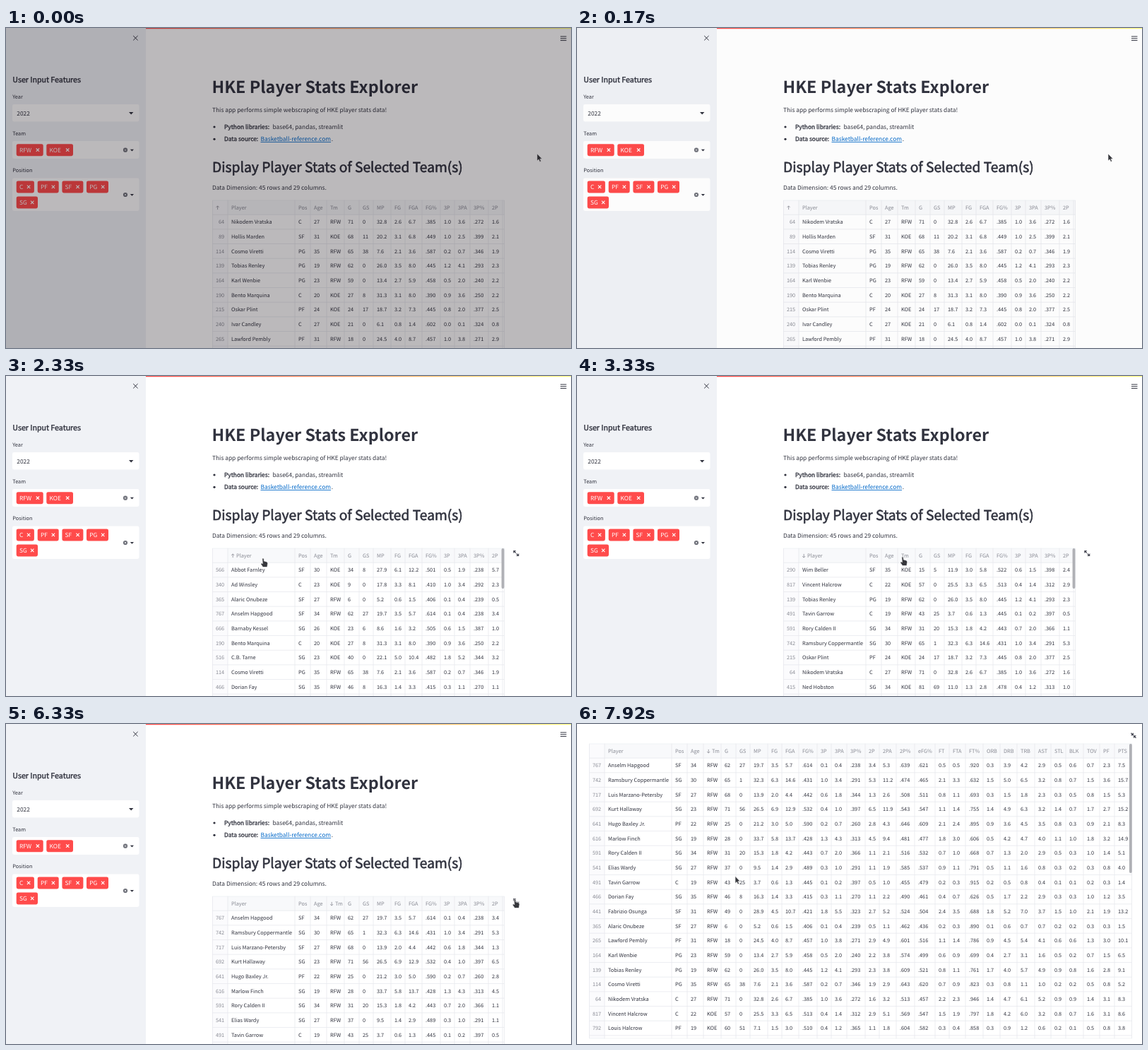
Animation of 800x453 px, one loop 8 s. Source, as an HTML page:

```html
<!DOCTYPE html>
<html lang="en">
<head>
<meta charset="utf-8">
<title>Player Stats Explorer</title>
<style>
  html, body { margin: 0; width: 100%; height: 100%; overflow: hidden; background: #fff; }
  svg { display: block; }
  text {
    font-family: "Noto Sans CJK JP", "Noto Sans CJK SC", "Noto Sans CJK KR", "Noto Sans CJK TC", "Noto Sans", sans-serif;
    font-size: 8.4px; fill: #31333f; text-rendering: geometricPrecision; white-space: pre;
  }
  .title { font-size: 23.3px; font-weight: 700; }
  .semi { stroke: #31333f; stroke-width: .3px; }
  .heading { font-size: 19.25px; stroke-width: .6px; }
  .side { font-size: 10.65px; stroke-width: .4px; }
  .label, .cell, .head, .index { font-size: 7.35px; }
  .head, .index { fill: #898b94; }
  .index { text-anchor: end; }
  .link { fill: #0068c9; text-decoration: underline; }
  .tag { fill: #fff; }
  .line { fill: none; stroke: #31333f; stroke-width: 1; }
  .grid { fill: none; stroke: #e8e9ee; stroke-width: .8; }
  .sort { fill: none; stroke: #898b94; stroke-width: .8; }
  .bar { fill: #b0b1b6; }
</style>
</head>
<body>
<svg id="stage" width="800" height="453" viewBox="0 0 800 453">
  <defs>
    <linearGradient id="glow"><stop stop-color="#ff4b4b"/><stop offset="1" stop-color="#fffd80"/></linearGradient>
  </defs>
</svg>
<script>
const stage = document.getElementById('stage');

function el(tag, attrs, parent = stage, content) {
  const node = document.createElementNS('http://www.w3.org/2000/svg', tag);
  for (const key in attrs) node.setAttribute(key, attrs[key]);
  if (content !== undefined) node.textContent = content;
  parent.appendChild(node);
  return node;
}
const text = (x, y, content, cls = '', parent = stage) => el('text', { x, y, class: cls }, parent, content);
const rect = (x, y, width, height, fill, rx = 0, parent = stage) => el('rect', { x, y, width, height, fill, rx }, parent);
const path = (d, attrs, parent = stage) => el('path', { d, ...attrs }, parent);
const show = (node, on) => node.setAttribute('display', on ? 'inline' : 'none');

function randomFrom(seed) {
  return (low, high) => {
    seed = (seed * 16807) % 2147483647;
    return low + (high - low) * seed / 2147483647;
  };
}

// Players in index order; their numbers follow from a seeded season
const roster = `Nikodem Vratska,C,RFW
Hollis Marden,SF,KOE
Cosmo Viretti,PG,RFW
Tobias Renley,PG,RFW
Karl Wenbie,PG,RFW
Bento Marquina,C,KOE
Oskar Plint,PF,KOE
Ivar Candley,C,KOE
Lawford Pembly,PF,RFW
Wim Beller,SF,KOE
Joselo Valdemínguez,PF,KOE
Ad Winsley,C,KOE
Alaric Onubeze,SF,RFW
Garrett Lisson,SF,KOE
Ned Hobston,SG,KOE
Fabrizio Osunga,SF,RFW
Dorian Fay,SG,RFW
Tavin Garrow,C,RFW
C.B. Tarne,SG,KOE
Elias Wardy,SG,RFW
Abbot Farnley,SF,KOE
Rory Calden II,SG,RFW
Marlow Finch,SG,RFW
Hugo Baxley Jr.,PF,RFW
Barnaby Kessel,SG,KOE
Kurt Hallaway,SG,RFW
Luis Marzano-Petersby,SF,RFW
Ramsbury Coppermantle,SG,RFW
Anselm Hapgood,SF,RFW
Louis Halcrow,PF,KOE
Vincent Halcrow,C,KOE`;

const one = v => v.toFixed(1);
const ratio = (made, tried) => tried < .05 ? '0' : (made / tried).toFixed(3).replace(/^0/, '');

function season(seed) {
  const rnd = randomFrom(seed * 7919);
  rnd(0, 1);
  const age = Math.floor(rnd(19, 38));
  const games = Math.floor(rnd(1, 82));
  const starts = Math.floor(games * Math.max(0, rnd(-.6, 1)));
  const minutes = rnd(3, 34);
  const shots = minutes * rnd(.2, .5);
  const threes = shots * rnd(.05, .55);
  const twos = shots - threes;
  const frees = minutes * rnd(.02, .12);
  const made3 = threes * rnd(.22, .4);
  const made2 = twos * rnd(.45, .65);
  const madeFree = frees * rnd(.6, .95);
  const made = made2 + made3;
  const off = minutes * rnd(.01, .07);
  const def = minutes * rnd(.08, .2);
  const rest = [.15, .04, .03, .06, .1].map(rate => one(minutes * rate * rnd(.5, 1.3)));
  return [age, games, starts, one(minutes),
    one(made), one(shots), ratio(made, shots),
    one(made3), one(threes), ratio(made3, threes),
    one(made2), one(twos), ratio(made2, twos),
    ratio(made + made3 / 2, shots),
    one(madeFree), one(frees), ratio(madeFree, frees),
    one(off), one(def), one(off + def), ...rest,
    one(made2 * 2 + made3 * 3 + madeFree)];
}

const players = roster.split('\n').map((line, i) => {
  const [name, pos, team] = line.split(',');
  const id = 64 + Math.round(i * 25.1);
  const [age, ...stats] = season(id);
  return { id, name, team, cells: [name, pos, age, team, ...stats] };
});

// Column heads with their widths
let nextX = 27;
const columns = ('Player 95,Pos 22,Age 23,Tm 25,G 21,GS 20,MP 25,FG 20,FGA 24,FG% 26,3P 20,3PA 22,3P% 26,2P 20,2PA 24,'
  + '2P% 26,eFG% 29,FT 20,FTA 23,FT% 25,ORB 24,DRB 24,TRB 25,AST 23,STL 21,BLK 25,TOV 23,PF 21,PTS 20')
  .split(',').map(entry => {
    const [name, width] = entry.split(' ');
    const x = nextX;
    nextX += +width;
    return { name, x };
  });
const PITCH = 20.67;

// Page
rect(0, 0, 800, 453, '#fff');
rect(198, 0, 602, 1.2, 'url(#glow)');
path('M785 12h8.5M785 14.8h8.5M785 17.6h8.5', { class: 'line', 'stroke-width': 1.2 });
text(291.5, 92, 'HKE Player Stats Explorer', 'title');
text(292, 118.5, 'This app performs simple webscraping of HKE player stats data!');
for (const y of [140, 157.3]) el('circle', { cx: 295, cy: y, r: 1.6, fill: '#31333f' });
text(309, 142.8, 'Python libraries:', 'semi');
text(377.5, 142.8, 'base64, pandas, streamlit');
text(309, 160, 'Data source:', 'semi');
text(360.5, 160, 'Basketball-reference.com', 'link');
text(460.8, 160, '.');
text(292, 203.6, 'Display Player Stats of Selected Team(s)', 'semi heading');
text(292, 228.6, 'Data Dimension: 45 rows and 29 columns.');
const anchor = path('M276.5 197.5a2.2 2.2 0 0 0 3.3.2l1.4-1.4a2.2 2.2 0 0 0-3.2-3.2l-.8.8M278.5 196.5a2.2 2.2 0 0 0-3.3-.2l-1.4 1.4a2.2 2.2 0 0 0 3.2 3.2l.8-.8',
  { fill: 'none', stroke: '#898b94' });

// Sidebar
rect(0, 0, 198, 453, '#f0f2f6');
path('M180.2 11l6.4 6.4M186.6 11l-6.4 6.4', { class: 'line' });
text(9.3, 76.8, 'User Input Features', 'semi side');
text(9.3, 99.8, 'Year', 'label');
text(9.3, 151.8, 'Team', 'label');
text(9.3, 204.2, 'Position', 'label');
rect(9, 108, 179.5, 24.5, '#fff', 2.4);
rect(9, 160, 179.5, 25, '#fff', 2.4);
rect(9, 212.5, 179.5, 46.5, '#fff', 2.4);
text(15.3, 123.7, '2022');
path('M174 119h6.4l-3.2 3.4z', { fill: '#31333f' });

function tag(x, y, w, label) {
  rect(x, y, w, 17, '#ff4b4b', 2.4);
  text(x + 4.2, y + 11.6, label, 'tag');
  path(`M${x + w - 10} ${y + 6.3}l4.4 4.4m0-4.4l-4.4 4.4`, { stroke: '#fff', 'stroke-width': 1.1 });
}
function clearer(y) {
  el('circle', { cx: 169, cy: y, r: 3.1, fill: '#6f717a' });
  path(`M167.9 ${y - 1.1}l2.2 2.2m0-2.2l-2.2 2.2`, { stroke: '#fff', 'stroke-width': .7 });
  path(`M175.8 ${y - 1}h5.2l-2.6 2.8z`, { fill: '#31333f' });
}
tag(14.7, 164.2, 38, 'RFW');
tag(57.3, 164.2, 37.7, 'KOE');
tag(14.7, 216.4, 25.2, 'C');
tag(44.7, 216.4, 30, 'PF');
tag(79.4, 216.4, 30, 'SF');
tag(114, 216.4, 31, 'PG');
tag(14.7, 238.4, 30.3, 'SG');
clearer(172.7);
clearer(236);

// Table, shared by the page and the full screen view
const cover = rect(0, 0, 800, 453, '#fff');
const table = el('svg', {});
rect(0, 0, 769, PITCH, '#f8f9fb', 0, table);
rect(0, 0, 22, 460, '#fbfbfd', 0, table);
let lines = '';
for (let i = 1; i < 21; i++) lines += `M0 ${(i * PITCH).toFixed(2)}H769`;
for (const { x } of columns) lines += `M${x - 5} 0V460`;
path(lines, { class: 'grid' }, table);
const frame = el('rect', { x: .4, y: .4, class: 'grid' }, table);

function view(key, dir, column) {
  const g = el('g', {}, table);
  const order = (a, b) => (a[key] < b[key] ? -1 : a[key] > b[key] ? 1 : a.id - b.id) * dir;
  const arrowX = column < 0 ? 7.6 : columns[column].x + 2.2;
  path(dir > 0 ? 'M0 5.2V0M-2 2L0 0 2 2' : 'M0 0V5.2M-2 3.2L0 5.2 2 3.2',
    { class: 'sort', transform: `translate(${arrowX} 8.4)` }, g);
  columns.forEach(({ name, x }, i) => text(x + (i === column ? 7 : 0), 13.2, name, 'head', g));
  [...players].sort(order).slice(0, 19).forEach((p, r) => {
    const y = 33.7 + r * PITCH;
    text(17.2, y, p.id, 'index', g);
    p.cells.forEach((c, i) => text(columns[i].x, y, c, 'cell', g));
  });
  return g;
}
// Start tick and sort order of each view
const views = [
  [0, view('id', 1, -1)],
  [17, view('name', 1, 0)],
  [29, view('name', -1, 0)],
  [43, view('team', 1, 3)],
  [60, view('team', -1, 3)]
];

const pageBar = el('rect', { x: 701.6, y: 244, width: 3.8, height: 57, rx: 1.9, class: 'bar' });
const fullBar = el('rect', { x: 782, y: 28, width: 3.8, height: 183, rx: 1.9, class: 'bar' });
const enter = path('M0 0v4l1.5-1.5 1.5 1.5 1-1-1.5-1.5 1.5-1.5zM5 4l-1 1 1.5 1.5-1.5 1.5h4v-4l-1.5 1.5z',
  { fill: '#4a4c57', transform: 'translate(718.3 247)' });
const exit = path('M1 0l-1 1 1.5 1.5-1.5 1.5h4v-4l-1.5 1.5zM4 4v4l1.5-1.5 1.5 1.5 1-1-1.5-1.5 1.5-1.5z',
  { fill: '#4a4c57', transform: 'translate(784 12.3)' });

// Pointer
const pointer = el('g', { fill: '#36373c', stroke: '#fff', 'stroke-width': .6, 'stroke-linejoin': 'round' });
const arrow = path('M0 0V10L2.3 8 3.8 11.4 5.6 10.6 4.1 7.3H7Z', {}, pointer);
const hand = path('M-1.2.6Q0-.8 1.1.6L1.4 4 5 4.9Q6.7 5.4 6.6 7.4L5.8 12.5H-.2L-3 8.4Q-3.4 6.7-1.8 6.9L-.6 7.7Z', {}, pointer);
const shade = rect(0, 0, 800, 453, '#0c060c');

// Resting and turning points: tick, x, y
const stops = [
  [0, 752, 178], [3, 752, 178], [10, 365, 254], [12, 364, 258], [33, 364, 258], [38, 461, 256], [64, 462, 256],
  [70, 706, 254], [76, 720.5, 248], [85, 720.5, 248], [89, 280, 417], [91, 72, 80], [93, 102, 153], [95, 224, 215.5]
];
const ease = k => k * k * (3 - 2 * k);

function pointAt(tick) {
  const i = stops.findIndex(s => s[0] >= tick);
  if (i < 1) return stops[0].slice(1);
  const [t0, x0, y0] = stops[i - 1], [t1, x1, y1] = stops[i];
  const k = ease((tick - t0) / (t1 - t0));
  return [x0 + (x1 - x0) * k, y0 + (y1 - y0) * k];
}

function draw(tick) {
  const full = tick >= 78;
  const hover = tick >= 10 && tick < 71;
  const [x, y] = pointAt(tick);
  const overHead = !full && x > 292 && x < 730 && y > 243 && y < 264;
  const [left, top, width, height] = full ? [17, 27.5, 769, 418] : [292, 243.5, 414, 209.5];

  for (const [key, value] of Object.entries({ x: left, y: top, width, height })) table.setAttribute(key, value);
  frame.setAttribute('width', width - .8);
  frame.setAttribute('height', (full ? height : 300) - .8);
  views.forEach(([start, g], i) => show(g, tick >= start && (i === views.length - 1 || tick < views[i + 1][0])));
  show(cover, full);
  show(fullBar, full);
  show(exit, full);
  show(pageBar, hover);
  show(enter, tick >= 10 && !full);
  show(anchor, tick >= 8 && tick < 11);
  show(hand, overHead);
  show(arrow, !overHead);
  pointer.setAttribute('transform', `translate(${x.toFixed(2)} ${y.toFixed(2)})`);
  shade.setAttribute('opacity', Math.max(0, .28 - .135 * tick));
}

// The picture advances 12 times per second
const begin = performance.now();
let last = -1;
function loop() {
  const t = (performance.now() - begin) % 8000;
  const tick = Math.min(95, Math.floor((t + 4) * .012));
  if (tick !== last) draw(last = tick);
  requestAnimationFrame(loop);
}
draw(0);
loop();
</script>
</body>
</html>
```
